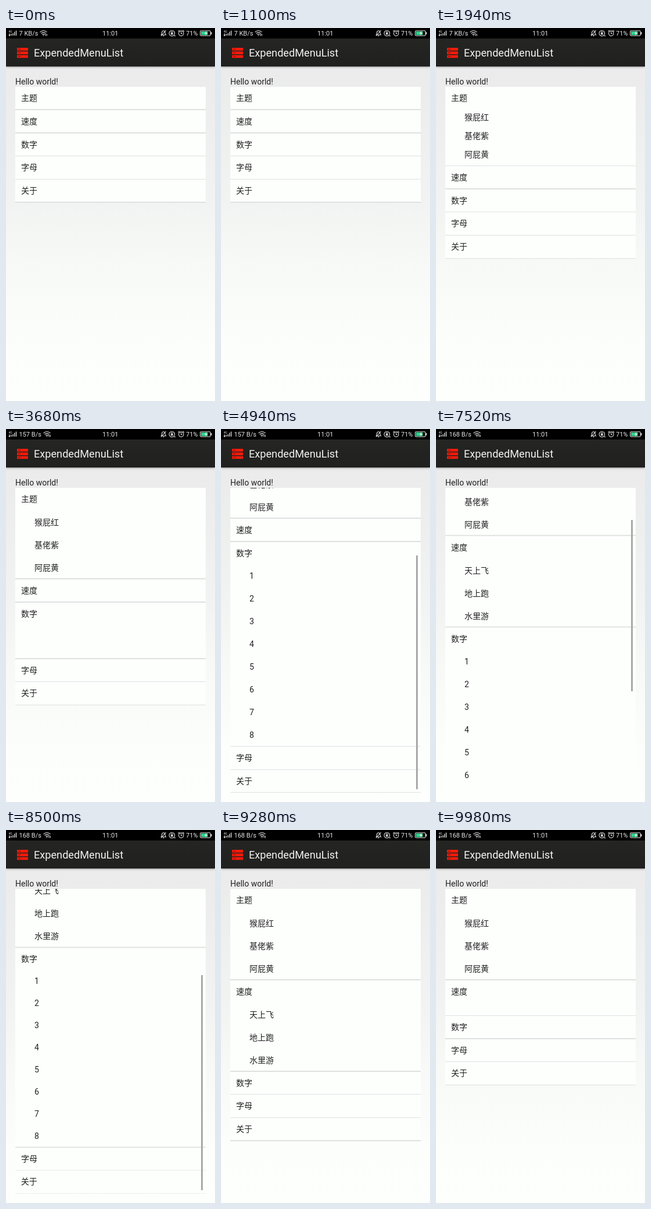
These frames come from a looping animation (360x640 px, 10 s). An HTML page:

```html
<!DOCTYPE html>
<html lang="zh-CN">
<head>
<meta charset="utf-8">
<title>ExpendedMenuList</title>
<style>
  html, body { margin: 0; width: 100%; height: 100%; overflow: hidden; }
  body {
    position: relative;
    font: 14px/18px Roboto, "Noto Sans CJK SC", "Noto Sans CJK", sans-serif;
    color: #202020;
    background: linear-gradient(#eaebea 66px, #f1f3f2 290px, #f7f9f7 400px, #fcfefb 545px, #fdfffd);
  }
  svg, #title, #hello, #view, #thumb { position: absolute; }
  svg { left: 0; top: 0; }
  #bar {
    position: absolute; left: 0; top: 18px; width: 360px; height: 48px;
    background: linear-gradient(#252623, #20211f);
    box-shadow: 0 1px 3px rgba(0, 0, 0, .4);
  }
  #title { left: 48px; top: 19px; font-size: 18.15px; line-height: 48px; color: #f3f3f3; white-space: nowrap; }
  #hello { left: 16px; top: 83px; }
  #view { left: 16px; top: 100.7px; width: 328px; height: 523.6px; overflow: hidden; }
  #list { transform-origin: 0 0; }
  .group { position: relative; background: #fdfffd; }
  .group::after {
    content: ""; position: absolute; left: 0; right: 0; bottom: 0;
    height: 1.3px; background: #dfe1e0;
  }
  .head { height: 39.75px; line-height: 39.75px; padding-left: 10px; }
  .kid { position: relative; height: var(--h); overflow: hidden; }
  .kid span { position: absolute; left: 33px; bottom: 0; line-height: 39px; }
  #thumb { left: 335.5px; width: 3px; background: #a8a8a8; }
</style>
</head>
<body>
<div id="bar"></div>
<div id="title">ExpendedMenuList</div>
<div id="hello">Hello world!</div>
<div id="view"><div id="list"></div></div>
<div id="thumb"></div>

<svg width="360" height="66" font-family="Roboto, sans-serif" font-size="11" fill="#e6e6e6">
  <rect width="360" height="18" fill="#000"/>
  <text x="4.5" y="8" font-size="5">4G</text>
  <path d="M6 9.5v3.5M5 12l1 1.2 1-1.2M9 13v-3M12 13V9M14.7 13V6.5M17.5 13V4.5" fill="none" stroke="#e6e6e6" stroke-width="1.3"/>
  <text id="speed" x="22.5" y="13"></text>
  <g id="wifi" fill="none" stroke="#e6e6e6" stroke-width="1.1">
    <path d="M0 7.2q6-5.4 12 0M2 9.4q4-3.6 8 0M4 11.5q2-1.8 4 0"/>
    <path d="M9.6 10v3.6M11.8 10v3.6" stroke-width="1"/>
    <circle cx="6" cy="13" r=".7" fill="#e6e6e6" stroke="none"/>
  </g>
  <text x="166" y="13">11:01</text>
  <g fill="none" stroke="#e6e6e6" stroke-width="1.1">
    <path d="M267 11.8h8.5q-1.5-1.5-1.5-4 0-3-2.7-3t-2.8 3q0 2.5-1.5 4M270 13.5h2.5M275.5 4l-8.5 9.7"/>
    <circle cx="285.8" cy="9" r="4.8"/>
    <path d="M284.5 8.5v-1q0-1.3 1.3-1.3t1.300 1.300v1"/>
    <rect x="283.900" y="8.500" width="3.800" height="2.800" fill="#e6e6e6" stroke="none"/>
    <path d="M289.500 13.500h2.500"/>
    <circle cx="301.700" cy="9.300" r="4.200"/>
    <path d="M301.700 6.800v2.700h2M296.500 6l2.500-2M307 6l-2.500-2"/>
    <rect x="334.600" y="4.700" width="17.500" height="8.600" rx="1.500"/>
  </g>
  <text x="310" y="13">71%</text>
  <rect x="336" y="6" width="11.500" height="6" fill="#2fd08a"/>
  <rect x="352.700" y="7" width="1.600" height="4"/>
  <path d="M345.500 5l-4 4.500h2.600l-1.100 3.800 4.200-5h-2.700z"/>
  <g id="icon" fill="#f91a0a"></g>
</svg>

<script>
const LOOP = 10000, ROW = 39.75, KID = 39, VIEW = 523.6, SLIDE = 500, LAG = 140;
const $ = id => document.getElementById(id);

// Menu data: label, children, opening and closing start times
const menu = [
  { name: '主题', kids: ['猴屁红', '基佬紫', '阿屁黄'], open: 1580 },
  { name: '速度', kids: ['天上飞', '地上跑', '水里游'], open: 6640, close: 9622 },
  { name: '数字', kids: [...'12345678'], open: 3540, close: 8448 },
  { name: '字母', kids: [] },
  { name: '关于', kids: [] }
];

function add(parent, cls, text = '') {
  const el = document.createElement('div');
  el.className = cls;
  el.textContent = text;
  return parent.appendChild(el);
}

for (const g of menu) {
  g.el = add($('list'), 'group');
  add(g.el, 'head', g.name);
  for (const k of g.kids) add(g.el, 'kid').innerHTML = `<span>${k}</span>`;
}

$('icon').innerHTML = [34, 40.2, 46.4].map(y =>
  `<rect x="19" y="${y}" width="19" height="4.8" rx=".6"/>` +
  `<rect x="21" y="${y + 1.7}" width="1.5" height="1.4" fill="#5a120c"/>` +
  `<rect x="23.5" y="${y + 1.7}" width="1.5" height="1.4" fill="#5a120c"/>`).join('');

const clamp = x => Math.min(1, Math.max(0, x));
const mix = (a, b, p) => a + (b - a) * p;
const linear = p => p;
const easeOut = p => 1 - (1 - p) ** 2;
const easeInOut = p => (1 - Math.cos(Math.PI * p)) / 2;

// Value at time t from [time, value] steps
function track(t, steps, ease) {
  const i = steps.findIndex(s => s[0] > t);
  if (i < 0) return steps[steps.length - 1][1];
  if (i === 0) return steps[0][1];
  const [t0, a] = steps[i - 1], [t1, b] = steps[i];
  return mix(a, b, ease((t - t0) / (t1 - t0)));
}

const scrollSteps = [[4580, 0], [4940, 1], [5760, 1], [6240, 0], [7340, 0], [8320, 1]];
const thumbSteps = [
  [4579, 0], [4580, 1], [5310, 1], [5540, 0], [5759, 0], [5760, 1],
  [6440, 1], [6690, 0], [7339, 0], [7340, 1], [8620, 1], [8860, 0]
];

// The first part of an opening slide is skipped, so rows appear with a jump
function openness(g, t) {
  if (!g.open || t < g.open + LAG) return 0;
  const shown = easeInOut(clamp((t - g.open) / SLIDE));
  return g.close ? shown - easeInOut(clamp((t - g.close) / SLIDE)) : shown;
}

function draw(t) {
  let content = 0;
  for (const g of menu) {
    const h = KID * openness(g, t);
    g.el.style.setProperty('--h', h + 'px');
    content += ROW + h * g.kids.length;
  }

  const second = t > 7000;
  const reach = second ? 221.5 : 104;
  const pull = track(t, scrollSteps, easeOut);
  const scroll = Math.min(pull * reach, Math.max(0, content - VIEW));
  // The tiny turn keeps text off the whole-pixel grid, so it slides smoothly
  $('list').style.transform = `translateY(${-scroll}px) rotate(.01deg)`;

  const top = mix(106, second ? 255 : 217, scroll / reach);
  const bottom = mix(second ? 366 : 401, 618, pull);
  Object.assign($('thumb').style, {
    top: top + 'px',
    height: bottom - top + 'px',
    opacity: track(t, thumbSteps, linear)
  });

  $('speed').textContent = t < 2000 ? '7 KB/s' : t < 6700 ? '157 B/s' : '168 B/s';
  $('wifi').setAttribute('transform', `translate(${t < 2000 ? 58.5 : 64.5} 0)`);
}

const start = performance.now();
function tick() {
  draw((performance.now() - start) % LOOP);
  requestAnimationFrame(tick);
}
tick();
</script>
</body>
</html>
```
